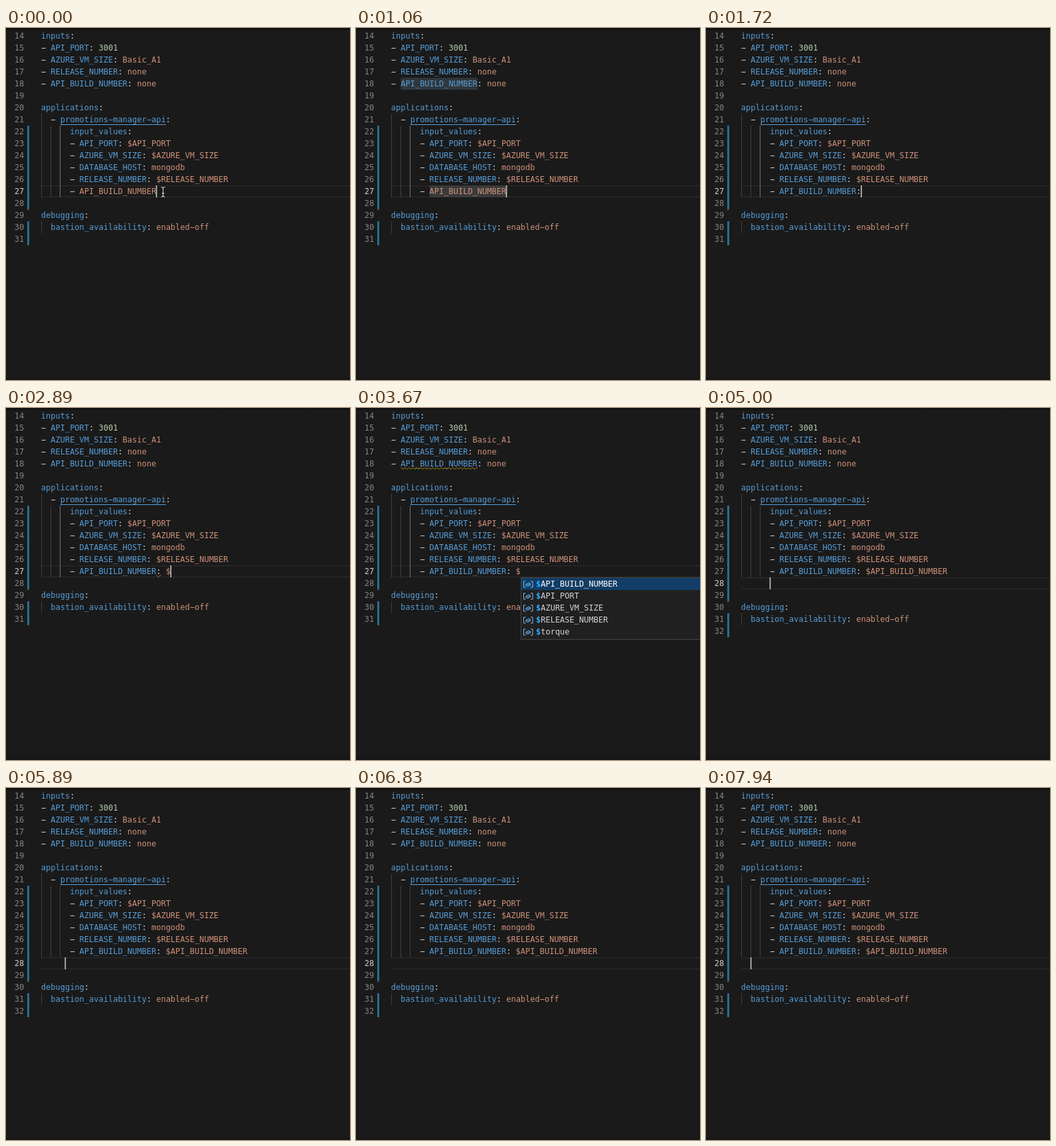
An HTML page with a canvas for the animation above (8 s loop, 518 by 530 pixels).

```html
<!DOCTYPE html>
<html lang="en">
<head>
<meta charset="utf-8">
<title>Editor autocomplete</title>
<style>
  html, body { margin: 0; width: 100%; height: 100%; overflow: hidden; background: #1a1a1a; }
  canvas { display: block; }
</style>
</head>
<body>
<canvas id="stage" width="518" height="530"></canvas>
<script>
const W = 518, H = 530, LOOP = 8000;
const LEFT = 53, CHAR = 7.224, ROW = 18, FIRST = 14;
const FONT = '12px "DejaVu Sans Mono", monospace';
const COLOR = {
  bg: '#1a1a1a', key: '#569cd6', plain: '#d4d4d4', string: '#ce9178', number: '#b5cea8',
  gutter: '#858585', current: '#d0d0d0', changed: '#26708f', guide: '#404040', active: '#747474'
};
const ctx = document.getElementById('stage').getContext('2d');

const HEAD = [
  'inputs:',
  '- API_PORT: 3001',
  '- AZURE_VM_SIZE: Basic_A1',
  '- RELEASE_NUMBER: none',
  '- API_BUILD_NUMBER: none',
  '',
  'applications:',
  '  - promotions-manager-api:',
  '      input_values:',
  '      - API_PORT: $API_PORT',
  '      - AZURE_VM_SIZE: $AZURE_VM_SIZE',
  '      - DATABASE_HOST: mongodb',
  '      - RELEASE_NUMBER: $RELEASE_NUMBER'
];
const TAIL = ['', 'debugging:', '  bastion_availability: enabled-off', ''];
const OPTIONS = ['API_BUILD_NUMBER', 'API_PORT', 'AZURE_VM_SIZE', 'RELEASE_NUMBER', 'torque'];

// Each edit: time, what follows the last key, and the caret column.
const EDITS = [
  [0, '', 24], [1720, ':', 25], [2000, ': ', 26], [2670, ': $', 27],
  [4000, ': $API_BUILD_NUMBER', 43], [5000, ': $API_BUILD_NUMBER', 6],
  [5890, ': $API_BUILD_NUMBER', 5], [6030, ': $API_BUILD_NUMBER', 4],
  [6150, ': $API_BUILD_NUMBER', 3], [6220, ': $API_BUILD_NUMBER', 2],
  [7920, ': $API_BUILD_NUMBER', 2]
];

const within = (t, from, to) => t >= from && t < to;
const colX = col => LEFT + col * CHAR;
const rowY = line => (line - FIRST) * ROW + 3;

function rect(x, y, w, h, color) {
  ctx.fillStyle = color;
  ctx.fillRect(x, y, w, h);
}

function text(str, x, y, color) {
  ctx.fillStyle = color;
  ctx.fillText(str.replace(/-/g, '\u2212'), x, y + 13);
}

function codeLine(str, line) {
  const y = rowY(line);
  const [, indent, dash = '', key, colon = '', value] = str.match(/^(\s*)(- )?([^:]*)(:)?(.*)$/);
  let col = indent.length;
  const put = (part, color) => {
    if (part.trim()) text(part, colX(col) - 0.2, y, color);
    col += part.length;
  };
  put(dash, COLOR.plain);
  const start = col;
  put(key, colon ? COLOR.key : COLOR.string);
  if (key.startsWith('promotions')) rect(colX(start), y + 16, key.length * CHAR, 1, COLOR.key);
  put(colon, COLOR.plain);
  put(value, /^ \d/.test(value) ? COLOR.number : COLOR.string);
}

function squiggle(col, count, line, color) {
  const x0 = colX(col), x1 = colX(col + count), y = rowY(line) + 16;
  ctx.beginPath();
  for (let x = x0; x <= x1; x += 0.5) ctx.lineTo(x, y - Math.cos((x - x0) * Math.PI / 3));
  ctx.strokeStyle = color;
  ctx.lineWidth = 1;
  ctx.stroke();
}

function guides(t, split) {
  const end = rowY(28);
  [[0, 21], [2, 22], [4, 22]].forEach(([col, line]) => {
    const color = col === 4 && !split ? COLOR.active : COLOR.guide;
    rect(Math.floor(colX(col)), rowY(line), 1, end - rowY(line), color);
  });
  rect(LEFT, rowY(30 + split), 1, ROW, COLOR.guide);
}

function gutter(current, last, split) {
  for (let line = FIRST; line <= last; line++) {
    text(String(line), 12.8, rowY(line), line === current ? COLOR.current : COLOR.gutter);
  }
  rect(32, rowY(22), 3, (7 + split) * ROW, COLOR.changed);
  rect(32, rowY(30 + split), 3, 2 * ROW, COLOR.changed);
  rect(32, rowY(29 + split), 2, 2, '#6b2525');
}

function variableIcon(x, y) {
  ctx.strokeStyle = '#75beff';
  ctx.lineWidth = 1;
  ctx.beginPath();
  for (const [edge, dir] of [[0.5, 1], [14, -1]]) {
    ctx.moveTo(x + edge + dir * 3, y - 4.5);
    ctx.lineTo(x + edge, y - 4.5);
    ctx.lineTo(x + edge, y + 4.5);
    ctx.lineTo(x + edge + dir * 3, y + 4.5);
  }
  ctx.moveTo(x + 4, y);
  ctx.lineTo(x + 8, y - 2.5);
  ctx.lineTo(x + 10.5, y - 1);
  ctx.lineTo(x + 10.5, y + 1);
  ctx.lineTo(x + 6.5, y + 3);
  ctx.lineTo(x + 4, y + 2);
  ctx.closePath();
  ctx.moveTo(x + 4, y);
  ctx.lineTo(x + 6.5, y + 1);
  ctx.lineTo(x + 10.5, y - 1);
  ctx.stroke();
}

function popup() {
  const x = 248, y = 255;
  rect(x, y, W - x, 94, '#454545');
  rect(x + 1, y + 1, W - x - 1, 92, '#202021');
  rect(x + 1, y + 1, W - x - 1, ROW, '#123d66');
  OPTIONS.forEach((name, i) => {
    const top = y + 1 + i * ROW;
    variableIcon(x + 4, top + 9.5);
    ctx.font = 'bold ' + FONT;
    text('$', 271, top, '#2aaaff');
    ctx.font = FONT;
    text(name, 271 + CHAR, top, i ? COLOR.plain : '#ffffff');
  });
}

function pointer(x, y) {
  ctx.beginPath();
  for (const s of [-1, 1]) {
    ctx.moveTo(x - 3, y + s * 7.5);
    ctx.quadraticCurveTo(x, y + s * 7.5, x, y + s * 5);
    ctx.quadraticCurveTo(x, y + s * 7.5, x + 3, y + s * 7.5);
  }
  ctx.moveTo(x, y - 6);
  ctx.lineTo(x, y + 6);
  ctx.moveTo(x - 2, y + 2);
  ctx.lineTo(x + 2, y + 2);
  for (const [width, color] of [[2.6, '#000000'], [1.1, '#e8e8e8']]) {
    ctx.lineWidth = width;
    ctx.strokeStyle = color;
    ctx.stroke();
  }
}

function edges() {
  const top = ctx.createLinearGradient(0, 0, 0, 4);
  top.addColorStop(0, '#0c0c0c');
  top.addColorStop(1, COLOR.bg);
  rect(0, 0, W, 4, top);
  const bottom = ctx.createLinearGradient(0, H - 6, 0, H);
  bottom.addColorStop(0, COLOR.bg);
  bottom.addColorStop(1, '#151517');
  rect(0, H - 6, W, 6, bottom);
}

function draw(t) {
  const [since, typed, caret] = EDITS.filter(edit => edit[0] <= t).pop();
  const split = t >= 5000 ? 1 : 0;
  const current = 27 + split;
  const lines = [...HEAD, '      - API_BUILD_NUMBER' + typed, ...(split ? [''] : []), ...TAIL];

  ctx.font = FONT;
  rect(0, 0, W, H, COLOR.bg);
  edges();
  const top = rowY(current);
  rect(LEFT, top, W - LEFT, 1.3, '#2a2a2a');
  rect(LEFT, top + ROW - 1.3, W - LEFT, 1.3, '#2a2a2a');
  if (within(t, 300, 1720)) {
    rect(colX(2), rowY(18), 16 * CHAR, ROW, '#30373c');
    rect(colX(8), rowY(27), 16 * CHAR, ROW, '#3a3a3a');
  }
  guides(t, split);
  gutter(current, FIRST + lines.length - 1, split);
  lines.forEach((str, i) => codeLine(str, FIRST + i));

  if (within(t, 2300, 3200)) squiggle(24, 1, 27, '#e5734b');
  if (within(t, 3200, 4700)) squiggle(2, 16, 18, '#c79a12');
  if (Math.floor((t - since) / 500) % 2 === 0 && !within(t, 3670, 3720)) {
    rect(colX(caret) - 0.6, top, 1.6, ROW, '#c8c8c8');
  }
  if (within(t, 3000, 4000)) popup();
  if (t < 950) pointer(236.5, 247);
}

function tick() {
  draw(performance.now() % LOOP);
  requestAnimationFrame(tick);
}
tick();
</script>
</body>
</html>
```
